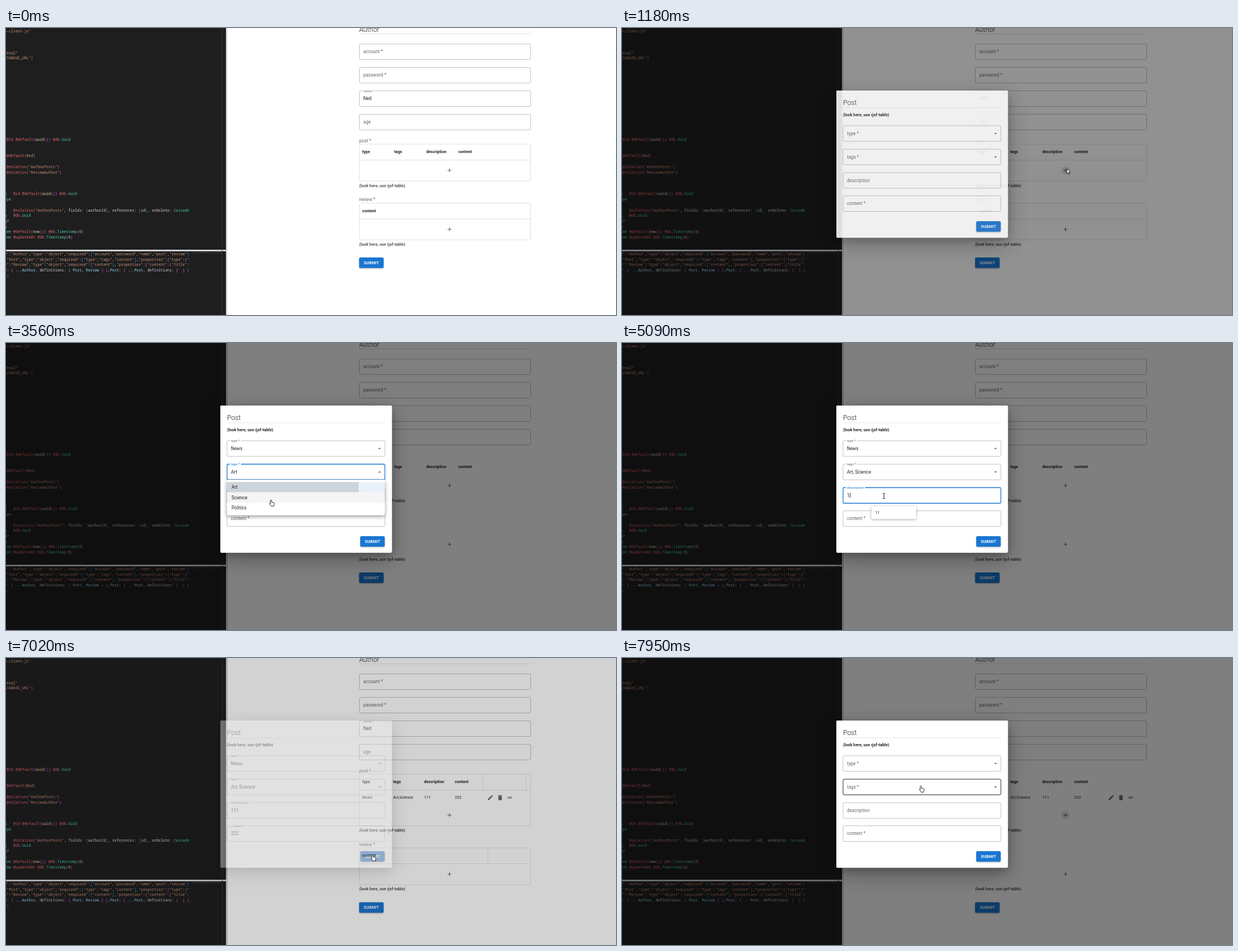
An HTML page with a canvas that plays this animation: 1090 by 514 pixels, repeating every 8000 ms.

```html
<!DOCTYPE html>
<html lang="en">
<head>
<meta charset="utf-8">
<title>Form demo</title>
<style>
  html, body { margin: 0; width: 100%; height: 100%; overflow: hidden; background: #fff; }
  canvas { display: block; }
</style>
</head>
<body>
<canvas id="stage" width="1090" height="514"></canvas>
<script>
const LOOP = 8000, BLUE = '#1976d2', INK = 'rgba(0,0,0,.87)', GREY = 'rgba(0,0,0,.6)';
const stage = document.getElementById('stage').getContext('2d');
const layer = Object.assign(document.createElement('canvas'), { width: 1090, height: 514 }).getContext('2d');
let g = stage;

const bursts = [[110, 910, 13], [1040, 1830, 13], [1900, 2700, 13], [2760, 3560, 13], [3630, 4420, 13],
  [4560, 4750, 4], [5090, 5090, 1], [5290, 6090, 13], [6150, 6950, 13], [7020, 7810, 12], [7880, 7950, 2]];

// Pointer path: [time, x, y].
const path = [[0, 1100, 525], [110, 1086, 506], [910, 795, 252], [1180, 795, 252], [1830, 560, 190],
  [1970, 545, 189], [2230, 480, 217], [2370, 480, 217], [2570, 489, 260], [2700, 482, 243], [2830, 470, 232],
  [2960, 465, 233], [3230, 462, 256], [3430, 463, 258], [3560, 473.5, 281], [3760, 472, 280], [4100, 468, 345],
  [4230, 468, 345], [4420, 468, 274], [5500, 468, 274], [5690, 468, 316], [6220, 468, 316], [6620, 655, 352],
  [7020, 655, 352], [7550, 794, 281], [7680, 794, 281], [7950, 534, 229]];

const dialogFields = [
  { label: 'type *', y: 175, focus: [1970, 2830], menu: [1970, 2430], options: ['News', 'Blog', 'Video'],
    values: [[2370, 'News']] },
  { label: 'tags *', y: 217, focus: [2830, 4560], menu: [2830, 4230], options: ['Art', 'Science', 'Politics'],
    values: [[3360, 'Art'], [3700, 'Art, Science']] },
  { label: 'description', y: 259, focus: [4560, 5690], values: [[5090, '1'], [5290, '11'], [5420, '111']],
    hints: [[4690, ['11', '22', '333', '222', 'abc']], [5090, ['11']], [5290, []]] },
  { label: 'content *', y: 300.5, focus: [5690, 6750], values: [[5890, '2'], [6020, '22'], [6150, '222']],
    hints: [[5720, ['22', '11', '333', '111', 'abc', 'aaa']], [5890, ['22']], [6020, []]] },
];

const icons = {
  add: 'M19 13h-6v6h-2v-6H5v-2h6V5h2v6h6z',
  down: 'M7 10l5 5 5-5z',
  up: 'M7 14l5-5 5 5z',
  edit: 'M3 17.25V21h3.75L17.81 9.94l-3.75-3.75zM20.71 7.04a1 1 0 000-1.41l-2.34-2.34a1 1 0 00-1.41 0l-1.83 1.83 3.75 3.75z',
  trash: 'M6 19c0 1.1.9 2 2 2h8c1.1 0 2-.9 2-2V7H6zM19 4h-3.5l-1-1h-5l-1 1H5v2h14z',
  drag: 'M20 9H4v2h16zM4 15h16v-2H4z',
};
const pointers = {
  arrow: 'M0 0v9l2-1.9 1.4 3.2 1.5-.6-1.4-3.2h2.8z',
  hand: 'M0 0c.9 0 1.2.6 1.2 1.2v3l3.6.8c.8.2 1.2.7 1.1 1.5l-.6 3.3-.6 1.5h-4l-3-4c-.6-.9.4-1.7 1.1-1l.1.5V1.2C-1.2.6-.9 0 0 0z',
  text: 'M-2.2-4.5h1.7l.5.5.5-.5h1.7M0-4V4M-2.2 4.5h1.7l.5-.5.5.5h1.7',
};

// Code lines: [row, column, text]; columns left of zero are cut by the edge.
const schema = [[0, -6, '"prisma-client-js"'], [4, -6, '"postgresql"'], [5, -6, 'env("DATABASE_URL")'],
  [20, 1, '@id @default(uuid()) @db.Uuid'], [23, 1, '@default(Ned)'],
  [25, 1, '@relation("AuthorPosts")'], [26, 1, '@relation("ReviewAuthor")'],
  [30, -5, 'String   @id @default(uuid()) @db.Uuid'], [31, -5, 'PostType'],
  [33, -5, 'Author   @relation("AuthorPosts", fields: [authorId], references: [id], onDelete: Cascade'],
  [34, -5, 'String   @db.Uuid'], [35, -5, 'String?'], [36, -5, 'String'],
  [37, -5, 'DateTime @default(now()) @db.Timestamp(6)'], [38, -5, 'DateTime @updatedAt @db.Timestamp(6)']];
const output = [
  [0, -5, '"title":"Author","type":"object","required":["account","password","name","post","review"]'],
  [1, -7, '"title":"Post","type":"object","required":["type","tags","content"],"properties":{"type":{"'],
  [2, -5, '"title":"Review","type":"object","required":["content"],"properties":{"content":{"title":'],
  [3, 0, 'y: { ...Author, definitions: { Post, Review } },Post: { ...Post, definitions: {  } }'],
  [4, 0, '};']];

const clamp = v => Math.max(0, Math.min(1, v));
const ease = v => (v = clamp(v)) * v * (3 - 2 * v);
const mix = (a, b, k) => a + (b - a) * k;
const within = (t, [a, b]) => t >= a && t < b;
const latest = (list, t, fallback) => list.reduce((found, [at, v]) => t >= at ? v : found, fallback);

function heldTime(t) {
  let held = 0;
  for (const [a, b, n] of bursts) {
    const step = (b - a) / (n - 1) || 1;
    if (t >= a) held = a + Math.min(n - 1, Math.floor((t - a) / step + .001)) * step;
  }
  return held;
}

function pointerAt(t) {
  const i = path.findIndex(p => p[0] >= t);
  if (i < 1) return { x: path[0][1], y: path[0][2] };
  const [a, x, y] = path[i - 1], [b, x2, y2] = path[i], k = ease((t - a) / (b - a));
  return { x: mix(x, x2, k), y: mix(y, y2, k) };
}

function rect(x, y, w, h, color) {
  g.fillStyle = color;
  g.fillRect(x, y, w, h);
}

function text(str, x, y, size = 8.15, color = INK, weight = 400, family = 'Roboto, sans-serif') {
  g.font = `${weight} ${size}px ${family}`;
  g.fillStyle = color;
  g.fillText(str, x, y + size * .35);
}

function icon(name, x, y, color = GREY) {
  g.save();
  g.translate(x, y);
  g.scale(.51, .51);
  g.translate(-12, -12);
  g.fillStyle = color;
  g.fill(new Path2D(icons[name]));
  g.restore();
}

function paper(x, y, w, h, blur, dy, alpha) {
  g.save();
  g.shadowColor = `rgba(0,0,0,${alpha})`;
  g.shadowBlur = blur;
  g.shadowOffsetY = dy;
  g.fillStyle = '#fff';
  g.beginPath();
  g.roundRect(x, y, w, h, 2);
  g.fill();
  g.restore();
}

function outline(x, y, w, h, color, width = 1) {
  g.strokeStyle = color;
  g.lineWidth = width;
  g.beginPath();
  g.roundRect(x, y, w, h, 2);
  g.stroke();
}

function button(x, y, hovered) {
  g.save();
  g.shadowColor = 'rgba(0,0,0,.35)';
  g.shadowBlur = 2.5;
  g.shadowOffsetY = 1;
  g.fillStyle = hovered ? '#1565c0' : BLUE;
  g.beginPath();
  g.roundRect(x, y, 43.7, 18.7, 2);
  g.fill();
  g.restore();
  g.textAlign = 'center';
  g.letterSpacing = '0.2px';
  text('SUBMIT', x + 21.9, y + 9.2, 7.14, '#fff', 700);
  g.letterSpacing = '0px';
  g.textAlign = 'left';
}

function field(x, y, w, label, { value = '', shrink = 0, focused, hovered, arrow } = {}) {
  const border = focused ? BLUE : hovered ? '#212121' : '#c0c0c0';
  outline(x, y, w, 28, border, focused ? 1.3 : 1);
  const size = mix(8.15, 6.1, shrink);
  g.font = `400 ${size}px Roboto, sans-serif`;
  if (shrink > 0) rect(x + 5, y - 1.5, (g.measureText(label).width + 4) * shrink, 3, '#fff');
  text(label, x + 7, mix(y + 14, y, shrink), size, focused ? BLUE : GREY);
  text(value, x + 7, y + 14);
  if (arrow) icon(arrow, x + w - 9.5, y + 14);
  else if (focused) rect(x + 7.5 + g.measureText(value).width, y + 9.5, .8, 9, '#000');
}

function codeLines(lines, top) {
  const colorOf = token => token[0] === '"' ? '#ce9178' : token[0] === '@' ? '#e0646c'
    : /^(uuid|now)$/.test(token) ? '#dcdcaa' : token === 'Ned' ? '#ce9178'
    : /^[A-Z]/.test(token) ? (lines === schema ? '#4ec9b0' : '#9cdcfe')
    : /[[\]]/.test(token) ? '#179fff' : /[(){}]/.test(token) ? '#da70d6' : '#d4d4d4';
  for (const [row, col, str] of lines)
    for (const m of str.matchAll(/"[^"]*"?|@\w+|\w+|[^\w\s]/g))
      text(m[0], -2.7 + (col + m.index) * 3.93, top + row * 9.72, 6.55, colorOf(m[0]), 400,
        '"Noto Sans Mono", monospace');
}

function editor() {
  rect(0, 0, 393, 514, '#1e1e1e');
  codeLines(schema, 5.5);
  rect(0, 397, 395, 3, '#cfd1d6');
  codeLines(output, 404.5);
  rect(327.5, 400, 60, 114, '#1e1e1e');
  for (let i = 0; i < 27; i++)
    for (let row = 0; row < 3; row++)
      if ((i * 7 + row * 3) % 5) rect(332 + i * 2, 401 + row, 1.6, .6, row ? '#4a3a38' : '#744e44');
  rect(386, 0, 1, 514, '#343434');
  rect(393, 0, 2.5, 514, '#cfd1d6');
}

function table(y, headers, row, step, narrow, showLines, plusLit) {
  const extra = row ? 26.5 : 0, x = 631.5;
  if (showLines) {
    outline(x, y, 306, 66 + extra, '#e0e0e0');
    rect(x, y + 28, 306, 1, '#e0e0e0');
    if (narrow) {
      const edges = headers.length > 1 ? [852, 929] : [860.5];
      edges.forEach(edge => rect(edge, y, 1, 28, '#e4e4e4'));
    }
  }
  headers.forEach((h, i) => text(h, 636.5 + i * step, y + 14, 7.14, INK, 700));
  if (row) {
    row.forEach((v, i) => text(v, 636.5 + i * step, y + 42, 7.14));
    const shift = narrow ? 0 : 8.7;
    ['edit', 'trash', 'drag'].forEach((name, i) => icon(name, 865.5 + shift + i * 17.4, y + 42));
  }
  if (plusLit) {
    g.fillStyle = 'rgba(0,0,0,.1)';
    g.beginPath();
    g.arc(792.5, y + 47 + extra, 7.6, 0, 7);
    g.fill();
  }
  icon('add', 792.5, y + 47 + extra);
}

function form(t, open, pointer) {
  rect(395.5, 0, 695, 514, '#fff');
  text('Author', 631, 2.3, 12.24, INK, 300);
  rect(631, 10, 306.5, 1, '#e0e0e0');
  const free = open < .01;
  [['account *'], ['password *'], ['name *', 'Ned'], ['age']].forEach(([label, value], i) =>
    field(631.5, 28.5 + i * 42, 306, label, { value, shrink: value ? 1 : 0 }));

  const added = t >= 6880, shift = added ? 26.5 : 0, narrow = added && t < 7110;
  const lines = open < .98;
  const onPlus = free && Math.hypot(pointer.x - 792.5, pointer.y - 255 - shift) < 8;
  const lit = onPlus || within(t, [1040, 1900]) || t > 7600;
  const caption = y => text('(look here, use rjsf-table)', 631, y, 7.25, 'rgba(0,0,0,.68)', 700);
  text('post *', 631, 202, 8.15, GREY);
  table(208, ['type', 'tags', 'description', 'content'], added && ['News', 'Art,Science', '111', '222'],
    narrow ? 55.2 : 57.2, narrow, lines, lit);
  caption(282 + shift);
  text('review *', 631, 307.5 + shift, 8.15, GREY);
  table(313.5 + shift, ['content'], null, 0, narrow, lines, false);
  caption(387 + shift);
  button(631, 411 + shift, false);
  return onPlus ? 'hand' : 'arrow';
}

function menu(f, t, pointer) {
  const alpha = ease((t - f.menu[0] + 40) / 150) * (1 - ease((t - f.menu[1]) / 150));
  if (t < f.menu[0] || alpha <= 0) return;
  const top = f.y + 28, selected = latest(f.values, t, '');
  g.globalAlpha = alpha;
  paper(395, top, 282, 63.5, 7, 2.5, .4);
  f.options.forEach((option, i) => {
    const y = top + 4 + i * 18.5;
    if (selected.includes(option)) rect(395, y, 282, 18.5, '#e9f2fa');
    else if (pointer.y >= y && pointer.y < y + 18.5) rect(395, y, 282, 18.5, '#f5f5f5');
    const clicked = f.values.find(([, v]) => v.endsWith(option));
    const age = clicked ? t - clicked[0] : -1;
    if (age > 0 && age < 450) rect(Math.max(395, 470 - age * .8), y,
      Math.min(677, 470 + age * .8) - Math.max(395, 470 - age * .8), 18.5,
      `rgba(0,0,0,${.12 * (1 - ease((age - 220) / 230))})`);
    text(option, 403, y + 9.2);
  });
  g.globalAlpha = 1;
}

function dialog(t, pointer) {
  paper(383, 112, 306.5, 263.5, 38, 12, .3);
  paper(383, 112, 306.5, 263.5, 15, 5, .2);
  text('Post', 395, 134, 12.24, INK, 300);
  rect(395, 142.5, 282, 1, '#e6e6e6');
  text('(look here, use rjsf-table)', 395, 155, 7.25, INK, 700);

  const inside = (x, y, w, h) => pointer.x >= x && pointer.x < x + w && pointer.y >= y && pointer.y < y + h;
  const openMenu = dialogFields.find(f => f.menu && within(t, f.menu));
  let shape = openMenu && inside(395, openMenu.y + 28, 282, 63.5) ? 'hand' : 'arrow';
  for (const f of dialogFields) {
    const hovered = !openMenu && inside(395, f.y, 282, 28);
    if (hovered) shape = f.menu ? 'hand' : 'text';
    field(395, f.y, 282, f.label, {
      value: latest(f.values, t, ''),
      shrink: t >= f.focus[0] ? ease((t - f.focus[0] + 60) / 200) : 0,
      focused: within(t, f.focus),
      hovered,
      arrow: f.menu && (f === openMenu ? 'up' : 'down'),
    });
  }
  const onSubmit = !openMenu && inside(633, 346, 44, 19);
  button(633, 346, onSubmit);

  for (const f of dialogFields) {
    if (f.menu) menu(f, t, pointer);
    const hints = latest(f.hints || [], t, []);
    if (hints.length) {
      paper(445.5, f.y + 33.5, 80, 4.4 + hints.length * 18.4, 4, 1, .35);
      hints.forEach((hint, i) => text(hint, 452, f.y + 44.7 + i * 18.4, 7.5, '#1f3a70'));
    }
  }
  return onSubmit ? 'hand' : shape;
}

function drawPointer(shape, { x, y }) {
  const outlinePath = new Path2D(pointers[shape]);
  g.save();
  g.translate(x, y);
  g.lineWidth = .9;
  g.strokeStyle = '#111';
  g.fillStyle = '#fff';
  if (shape !== 'text') g.fill(outlinePath);
  g.stroke(outlinePath);
  g.restore();
}

function draw(t) {
  const pointer = pointerAt(t);
  const open = ease((t - 1010) / 210) * (1 - ease((t - 6930) / 150)) + ease((t - 7600) / 200);
  g = stage;
  editor();
  let shape = form(t, open, pointer);
  if (open > 0) {
    rect(0, 0, 1090, 514, `rgba(0,0,0,${.5 * open})`);
    g = layer;
    g.clearRect(0, 0, 1090, 514);
    shape = dialog(t > 7400 ? 0 : t, pointer);
    g = stage;
    g.globalAlpha = open;
    g.drawImage(layer.canvas, 0, 0);
    g.globalAlpha = 1;
  }
  drawPointer(shape, pointer);
}

const start = performance.now();
function tick() {
  draw(heldTime((performance.now() - start) % LOOP));
  requestAnimationFrame(tick);
}
tick();
</script>
</body>
</html>
```
